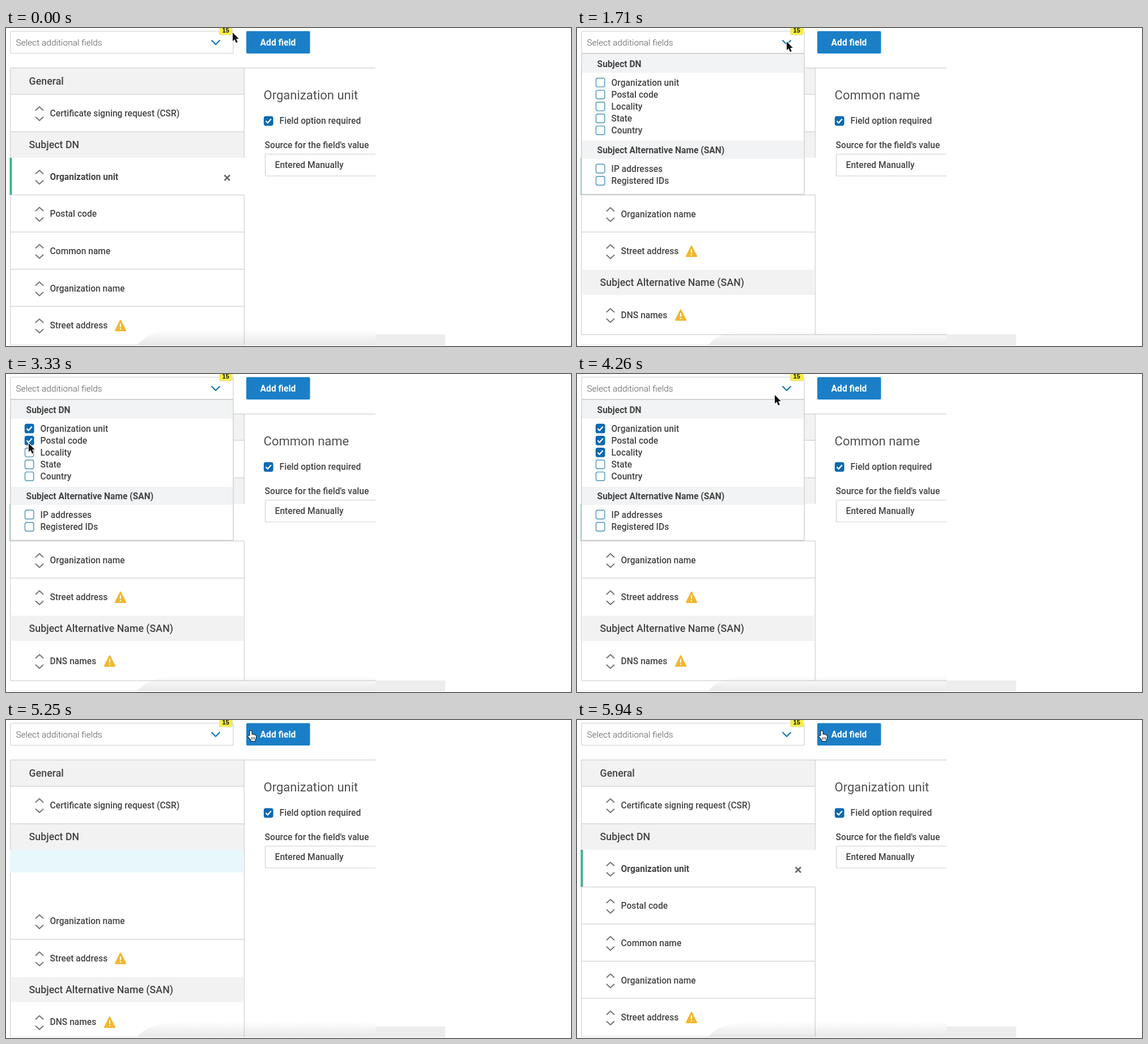
Animation, 997 px wide and 561 px high, one loop 6450 ms. Source, as an HTML page with a canvas:

```html
<!DOCTYPE html>
<html lang="en">
<head>
<meta charset="utf-8">
<title>Add certificate fields</title>
<style>
  html, body { margin: 0; width: 100%; height: 100%; overflow: hidden; background: #fff; }
  canvas { display: block; }
</style>
</head>
<body>
<canvas id="stage" width="997" height="561"></canvas>
<script>
const ctx = document.getElementById('stage').getContext('2d');
const LOOP = 6450;
const INK = '#434343', LINE = '#cfcfcf', BAND = '#f2f2f2', BLUE = '#0d69b0';
const LIST_TOP = 229, ROW = 65.5;

// Key times in ms
const LIST_RESET = 1320, MENU_OPEN = 1620, MENU_CLOSE = 4560, ADD = 4800, HAND = 4395;
const CHECKED_AT = [2700, 3180, 3660];
const CURSOR = [
  [0, 400, 8], [480, 400, 8], [600, 400, -25], [1400, 395, -25], [1560, 370, 24],
  [1830, 370, 24], [2400, 40, 99], [2880, 40, 99], [3030, 40, 120], [3300, 40, 120],
  [3450, 40, 141], [4020, 40, 141], [4250, 349, 37], [LOOP, 349, 37]
];

const ramp = (t, from, to) => Math.min(1, Math.max(0, (t - from) / (to - from)));
const smooth = x => x * x * (3 - 2 * x);

function fade(alpha, draw) {
  if (alpha <= 0) return;
  ctx.save();
  ctx.globalAlpha *= alpha;
  draw();
  ctx.restore();
}

// y is the middle of the capital letters
function text(str, x, y, { size = 15.6, weight = 500, color = INK, family = 'Roboto' } = {}) {
  ctx.font = `${weight} ${size}px ${family}, sans-serif`;
  ctx.fillStyle = color;
  ctx.fillText(str, x - 0.4, y + size * 0.355);
}

function rect(x, y, w, h, color) {
  ctx.fillStyle = color;
  ctx.fillRect(x, y, w, h);
}

function box(x, y, w, h, r, fill, stroke, width = 1) {
  ctx.beginPath();
  ctx.roundRect(x, y, w, h, r);
  if (fill) { ctx.fillStyle = fill; ctx.fill(); }
  if (stroke) { ctx.strokeStyle = stroke; ctx.lineWidth = width; ctx.stroke(); }
}

function path(points, color, width) {
  ctx.beginPath();
  points.forEach(([x, y]) => ctx.lineTo(x, y));
  ctx.strokeStyle = color;
  ctx.lineWidth = width;
  ctx.stroke();
}

const hline = (x1, x2, y) => rect(x1, y - 0.6, x2 - x1, 1.2, LINE);
const vline = (x, y1, y2) => rect(x - 0.6, y1, 1.2, y2 - y1, LINE);

function checkbox(x, y, on) {
  box(x - 7.5, y - 7.7, 15.4, 15.4, 3, on ? BLUE : '#fff', on ? BLUE : '#4a93b5', 1.4);
  if (on) path([[x - 4.5, y], [x - 1.3, y + 3.5], [x + 4.8, y - 3.5]], '#fff', 2.2);
}

function warning(x, y) {
  ctx.beginPath();
  ctx.moveTo(x, y - 9);
  ctx.lineTo(x + 9, y + 9);
  ctx.lineTo(x - 9, y + 9);
  ctx.closePath();
  ctx.fillStyle = ctx.strokeStyle = '#f3b62f';
  ctx.lineWidth = 2.2;
  ctx.lineJoin = 'round';
  ctx.fill();
  ctx.stroke();
  path([[x, y - 3.5], [x, y + 3]], '#fff', 2.2);
  rect(x - 1.1, y + 5, 2.2, 2.2, '#fff');
}

function row(label, y, { selected = false, warnX = 0 } = {}) {
  path([[52, y - 4.5], [59, y - 11], [66, y - 4.5]], '#777', 2);
  path([[52, y + 6.7], [59, y + 13.2], [66, y + 6.7]], '#777', 2);
  text(label, 78, y, { weight: selected ? 700 : 500 });
  if (warnX) warning(warnX, y + 0.3);
  if (selected) {
    rect(6.5, y - 33, 4, ROW, '#36b68a');
    path([[385.5, y - 2.5], [395, y + 7]], '#666', 2.5);
    path([[395, y - 2.5], [385.5, y + 7]], '#666', 2.5);
  }
}

function band(label, top, height) {
  rect(8, top, 412, height, BAND);
  text(label, 41, top + height / 2, { size: 17.8 });
}

function list(t) {
  const before = t < LIST_RESET;
  const grow = before ? 1 : t < 5040 ? 0 : Math.max(0.014, smooth(ramp(t, 5190, 5400)));
  const reveal = before ? 1 : ramp(t, 5250, 5800);
  const old = before ? 0 : 1 - ramp(t, ADD, 5040);
  const tint = before || t < 5040 ? 0 : 1 - ramp(t, 5500, 5860);
  const height = ROW * 3 * grow;
  const rest = LIST_TOP + height + ROW * (1 - grow);
  const san = rest + 2 * ROW, bottom = san + 115.5;

  band('General', 70, 47);
  band('Subject DN', 183, 46);
  hline(8, 652, 70.5);
  hline(8, 420, 117);
  hline(8, 420, 183);
  row('Certificate signing request (CSR)', 150);
  vline(7.8, 70, bottom);
  vline(420.3, 70, LIST_TOP);
  fade(1 - Math.max(old, reveal), () => vline(420.3, LIST_TOP, LIST_TOP + ROW));
  vline(420.3, LIST_TOP + ROW, bottom);

  fade(tint, () => rect(7, LIST_TOP, 413, height, '#e8f8fa'));
  fade(reveal, () => ['Organization unit', 'Postal code', 'Common name'].forEach((name, i) => {
    const top = LIST_TOP + i * height / 3;
    if (i) hline(8, 420, top);
    row(name, top + 33, { selected: !i });
  }));
  fade(old, () => row('Common name', LIST_TOP + 33, { selected: true }));

  fade(Math.max(old, grow > 0.5 ? 1 : 0), () => hline(8, 420, rest));
  row('Organization name', rest + 33.5);
  hline(8, 420, rest + ROW);
  row('Street address', rest + ROW + 33.5, { warnX: 202 });
  band('Subject Alternative Name (SAN)', san + 1, 44.5);
  row('DNS names', san + 80.5, { warnX: 183 });
  hline(8, 652, bottom);
}

function panel(title) {
  text(title, 455, 118.5, { size: 22, weight: 400, color: '#505050' });
  checkbox(463, 164, true);
  text('Field option required', 483, 163.5);
  text("Source for the field's value", 457, 206.5);
  box(457.5, 222.5, 230, 38.5, 2, '#fff', LINE, 1.2);
  text('Entered Manually', 475, 241.5);
  rect(652, 60, 345, 501, '#fff');
}

function toolbar() {
  box(8, 5.5, 393, 39, 2, '#fff', LINE, 1.2);
  text('Select additional fields', 18, 25, { size: 15.5, weight: 300, color: '#555' });
  path([[362.5, 21.5], [370, 29], [377.5, 21.5]], '#1878b4', 2.3);
  box(376, -4, 24, 17, 3, '#e9e5bd');
  box(377, -4, 22, 15.5, 3, '#f8ee42');
  text('15', 382, 4, { size: 11, weight: 700, color: '#111', family: '"Liberation Sans"' });
  box(424, 5.5, 112.5, 39.5, 2, '#1b7fc7');
  text('Add field', 449, 25, { weight: 700, color: '#fff' });
}

function menu(t) {
  box(8, 45, 393, 248.5, 1, '#fff', '#c8cccc', 1.3);
  rect(9, 46, 391, 33, '#f2f3f4');
  rect(9, 199, 391, 32, '#f2f3f4');
  rect(6.5, LIST_TOP, 1.5, ROW, '#b5cec5');
  text('Subject DN', 36, 63.2, { weight: 700 });
  text('Subject Alternative Name (SAN)', 36, 215.2, { weight: 700 });
  ['Organization unit', 'Postal code', 'Locality', 'State', 'Country'].forEach((name, i) => {
    const y = 96.2 + i * 21.1;
    checkbox(41, y, t >= CHECKED_AT[i]);
    text(name, 61, y);
  });
  ['IP addresses', 'Registered IDs'].forEach((name, i) => {
    const y = 248 + i * 21.5;
    checkbox(41, y, false);
    text(name, 61, y);
  });
}

function dock() {
  const shade = ctx.createLinearGradient(0, 532, 0, 556);
  shade.addColorStop(0, 'rgba(120,120,120,0)');
  shade.addColorStop(1, 'rgba(120,120,120,.15)');
  ctx.fillStyle = shade;
  ctx.beginPath();
  ctx.moveTo(232, 559);
  ctx.quadraticCurveTo(250, 535, 300, 532);
  ctx.lineTo(652, 532);
  ctx.lineTo(652, 559);
  ctx.fill();
  rect(652, 540.5, 123, 18.5, '#ededed');
  rect(8, 558.5, 767, 1, '#dedede');
  rect(0, 559.5, 997, 2, '#fff');
}

const ARROW = new Path2D('M0 0V15.2L3.5 12L6 18.2L8.8 17L6.2 11H10.8Z');
const POINTER = new Path2D('M3 9V1.8Q3 0 4.5 0T6 1.8V7Q7.5 5.6 8.7 7.2Q10.2 6.2 11.2 7.8Q13.5 7.2 13.5 9.5V12Q13.5 14 12 15.5V18H5V16L.5 11.2Q-.8 9.2 1 8.6Q2 8.5 3 9Z');

function cursor(t) {
  const hand = t >= HAND;
  let x = 427.5, y = 19;
  if (!hand) {
    const i = CURSOR.findIndex(key => key[0] > t);
    const [t0, x0, y0] = CURSOR[i - 1], [t1, x1, y1] = CURSOR[i];
    const k = smooth(ramp(t, t0, t1));
    x = x0 + (x1 - x0) * k;
    y = y0 + (y1 - y0) * k;
  }
  ctx.save();
  ctx.translate(x, y);
  ctx.lineJoin = 'round';
  ctx.lineWidth = 2;
  ctx.strokeStyle = hand ? '#151515' : '#fff';
  ctx.fillStyle = hand ? '#fff' : '#111';
  const shape = hand ? POINTER : ARROW;
  ctx.stroke(shape);
  ctx.fill(shape);
  if (hand) [6, 8.5, 11].forEach(fx => path([[fx, 11], [fx, 15.5]], '#333', 1));
  ctx.restore();
}

function frame(now) {
  const t = now % LOOP;
  rect(0, 0, 997, 561, '#fff');
  list(t);
  panel(t >= LIST_RESET && t < ADD ? 'Common name' : 'Organization unit');
  toolbar();
  if (t >= MENU_OPEN && t < MENU_CLOSE) menu(t);
  dock();
  cursor(t);
}

const start = performance.now();
function tick() {
  frame(performance.now() - start);
  requestAnimationFrame(tick);
}
tick();
</script>
</body>
</html>
```
